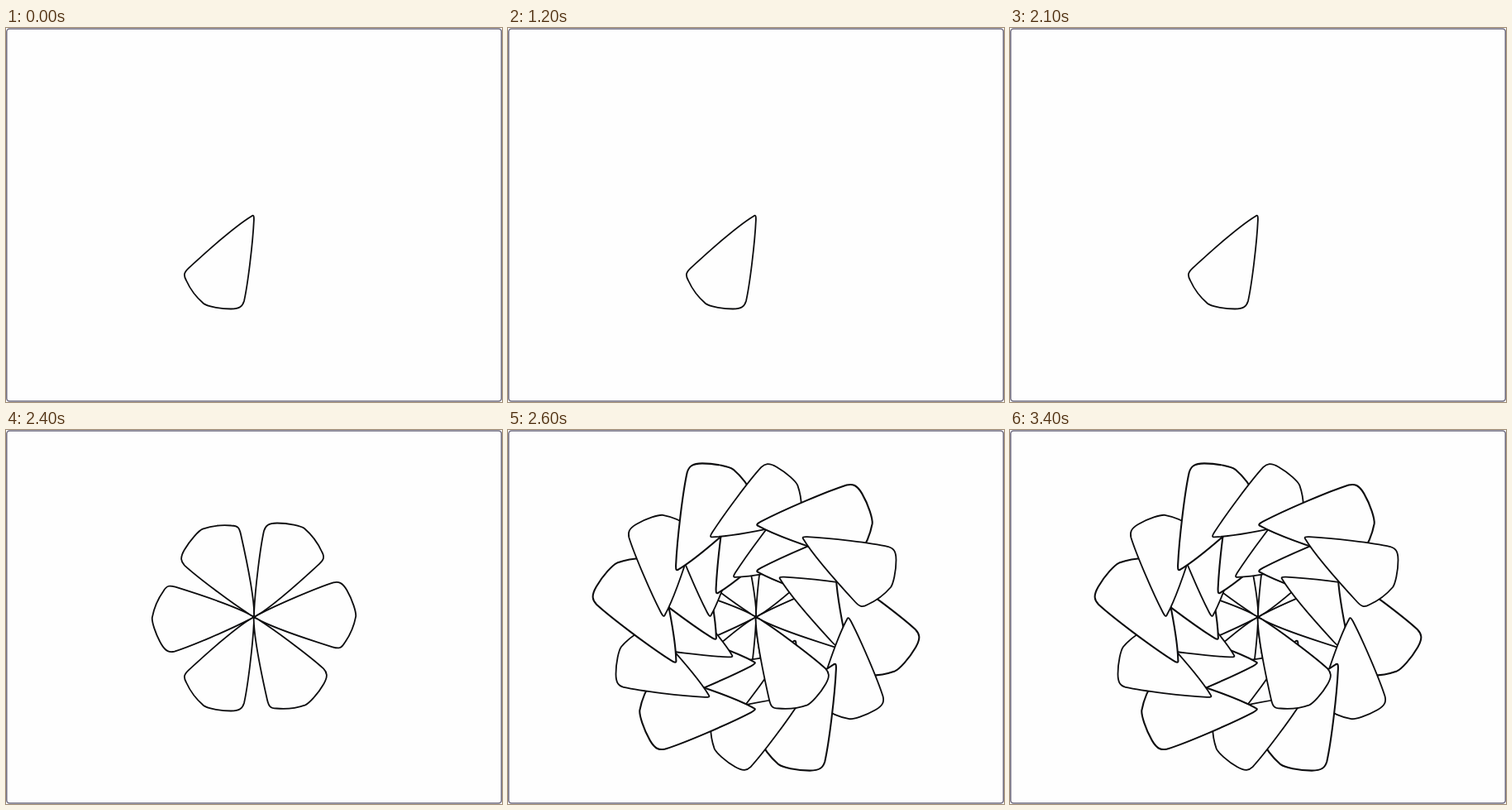
Recreate the animation shown at these times as an HTML page. Size 600 by 452 pixels, loop 5 s.

```html
<!DOCTYPE html>
<html lang="en">
<head>
<meta charset="utf-8">
<title>Petal stamps</title>
<style>
  html, body { margin: 0; width: 100%; height: 100%; overflow: hidden; background: #fefefe; }
  svg { display: block; width: 100vw; height: 100vh; }
  text { font: 500 8px Inter, Roboto, sans-serif; }
</style>
</head>
<body>
<svg viewBox="0 0 600 452">
  <defs>
    <path id="petal" fill="#fefefe" stroke="#0c0c0e" stroke-width="1.8" stroke-linejoin="round"
      d="M-3 1.4C-25.3 14.9-59.3 46-79 64.2C-84 69-86 72-82 79C-77 90-68 101-61 107C-57 110-42 113.5-28 113.5C-17 113.5-13.8 110-12 104C-7.5 84-1.4 34-.1 6C.1 1-.5-.5-3 1.4Z"/>
  </defs>
  <rect width="600" height="452" fill="#fefefe"/>
  <g id="flower"></g>
  <rect x=".8" y="1" width="598.5" height="450" rx="3.5" fill="none" stroke="#6f6c80" stroke-width="1.5"/>
  <path id="cursor" d="M0 0V11.5L2.6 9.2L4.3 13L6.1 12.2L4.4 8.5H8Z" fill="#0c0c0e"/>
  <g id="label">
    <path d="M12 0H35V17Q35 19 33 19H14Q12 19 12 17Z" fill="#09090b"/>
    <text x="23.5" y="10.6" text-anchor="middle" fill="#f4f4f6">Go</text>
  </g>
</svg>
<script>
const LOOP = 5000, STEP = 100, RADIUS = 56, LARGE = 1.142;
const byId = id => document.getElementById(id);
const flower = byId('flower'), cursor = byId('cursor'), label = byId('label');

// Cursor tip at each step from 400 ms on
const trail = [[27, 393], [14, 235], [3, 95], [-4, 26], [-4, 14], [-4, 5], [-2, 1], [-3, -2]];

function addPetal(turn, ring, from, to = LOOP) {
  const el = document.createElementNS('http://www.w3.org/2000/svg', 'use');
  const dir = (turn + 30) * Math.PI / 180;
  const x = 300 + ring * RADIUS * Math.cos(dir);
  const y = 226 + ring * RADIUS * Math.sin(dir);
  const size = ring && turn % 60 === 0 ? LARGE : 1;
  el.setAttribute('href', '#petal');
  el.setAttribute('transform', `translate(${x} ${y}) rotate(${turn}) scale(${size})`);
  flower.append(el);
  return { el, from, to };
}

const petals = [];
for (let i = 0; i < 6; i++) petals.push(addPetal(i * 60, 0, i ? 2400 : 0));
// The last two of the first round already reach the outer ring
for (let i = 0; i < 12; i++) petals.push(addPetal(i * 30, i < 10 ? 1 : 2, 2500));
for (let i = 0; i < 10; i++) petals.push(addPetal(i * 30, 2, 2600));
// The stamping petal itself stays on top at the centre
petals.push(addPetal(0, 0, 2500, 2600), addPetal(300, 0, 2600));

const show = (el, on) => el.setAttribute('visibility', on ? 'visible' : 'hidden');

function draw(t) {
  for (const p of petals) show(p.el, t >= p.from && t < p.to);
  const tip = trail[Math.floor(t / STEP) - 4];
  show(cursor, tip);
  if (tip) cursor.setAttribute('transform', `translate(${tip})`);
  show(label, t >= 1900 && t < 2100);
}

const start = performance.now();
function tick() {
  draw((performance.now() - start) % LOOP);
  requestAnimationFrame(tick);
}
tick();
</script>
</body>
</html>
```
